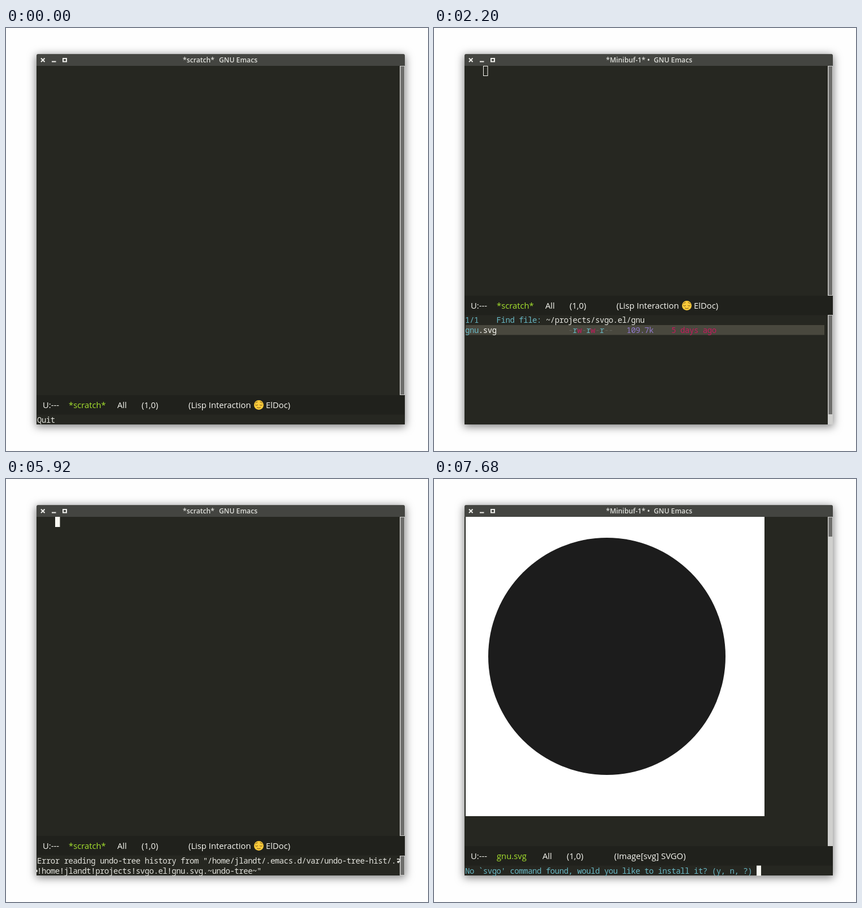
Animation, 747 px wide and 749 px high, one loop 8 s. Source, as an HTML page:

```html
<!DOCTYPE html>
<html lang="en">
<head>
<meta charset="utf-8">
<title>Editor</title>
<style>
  html, body { margin: 0; width: 100%; height: 100%; overflow: hidden; background: #fefefe; }
  #shade {
    position: absolute; left: 54px; top: 46px; width: 652px; height: 656px;
    border-radius: 3px 3px 0 0; box-shadow: 0 3px 15px 1px rgba(0, 0, 0, .5);
  }
  svg { position: absolute; left: 0; top: 0; display: block; }
  text { white-space: pre; }
  .mono { font: 14px "Noto Sans Mono", monospace; letter-spacing: -.46px; }
  .mode { font: 14.8px "Open Sans", sans-serif; }
  .title { font: 600 12.2px "Open Sans", sans-serif; }
</style>
</head>
<body>
<div id="shade"></div>
<svg width="747" height="749" viewBox="0 0 747 749">
  <path d="M54 67V49q0-3 3-3H703q3 0 3 3V67z" fill="#444541"/>
  <path d="M57 46.5H703" stroke="#555652"/>
  <g fill="none" stroke="#eeeeea" stroke-width="2">
    <path d="M62 53.500l6.500 6.500m0-6.500l-6.500 6.500M81 59.500h7.500"/>
    <rect x="101" y="54" width="6" height="5.500"/>
  </g>
  <rect x="54" y="67" width="652" height="635" fill="#262721"/>
  <g id="view"></g>
</svg>
<script>
const LOOP = 8000, CELL = 7.94, LEFT = 55, ROW = 17.64;
const FG = '#e4e4de', WHITE = '#f8f8f2', CYAN = '#68b7c3', PINK = '#c41a5c',
      PURPLE = '#8f78c9', DIM = '#5f6058', GREEN = '#a6e22e';

const esc = s => s.replace(/&/g, '&amp;').replace(/</g, '&lt;');
const rect = (x, y, w, h, fill, more = '') =>
  `<rect x="${x}" y="${y}" width="${w}" height="${h}" fill="${fill}" ${more}/>`;
const text = (cls, x, y, s, fill, more = '') =>
  `<text class="${cls}" x="${x}" y="${y}" fill="${fill}" ${more}>${esc(s)}</text>`;
const mono = (col, y, s, fill = FG, more) => text('mono', LEFT + col * CELL, y, s, fill, more);

// name end, application start
const titles = {
  scratch: ['*scratch*', 369, 377],
  mini: ['*Minibuf-1* •', 382, 389],
  file: ['~/projects/svgo.el/gnu.svg', 423, 432]
};
function title(key) {
  const [name, end, start] = titles[key];
  return text('title', end, 61, name, '#dedfda', 'text-anchor="end"') +
         text('title', start, 61, 'GNU Emacs', '#dedfda');
}

function scrollbar(top, bottom, thumbEnd = bottom) {
  return rect(697, top, 9, bottom - top, '#d0d0ce') +
         rect(698.5, top + 1, 6.5, thumbEnd - top - 2, '#6d6d6b');
}

function face(y) {
  return `<g transform="translate(447.5 ${y})" fill="none" stroke="#67491a" stroke-linecap="round">
    <circle r="8.500" fill="#fbcb3a" stroke="none"/>
    <path d="M-6-3.500q1.500-2 3.500-2M6-3.500q-1.500-2-3.500-2M-6 0q1.800 2 4 0M2 0q2.200 2 4 0M-3 4.500q3 2 6 0"/></g>`;
}

function modeline(top, image) {
  const y = top + 23, put = (x, s, fill = WHITE) => text('mode', x, y, s, fill);
  const left = rect(54, top, 652, 34.5, '#20211c') + put(65, 'U:---');
  return left + (image
    ? put(111, 'gnu.svg', GREEN) + put(192, 'All') + put(235, '(1,0)') + put(319, '(Image[svg] SVGO)')
    : put(111, '*scratch*', GREEN) + put(197, 'All') + put(240, '(1,0)') +
      put(323, '(Lisp Interaction') + face(top + 17.5) + put(460, 'ElDoc)'));
}

const picture = () => rect(56, 67, 529, 530, '#fff') +
  '<circle cx="306" cy="314" r="210" fill="#1c1c1c"/>';

function mainCursor(kind) {
  if (kind === 'solid') return rect(87, 67, 8.5, 18, WHITE);
  if (kind === 'hollow') return rect(87.5, 67.5, 7.5, 17, 'none', `stroke="${WHITE}"`);
  return '';
}

const block = (col, top) => rect(Math.round(LEFT + col * CELL), top, 8, 18, WHITE);

function fileRow(i, name, mode, size, age, typed) {
  const y = 540 + i * ROW;
  let out = i ? '' : rect(56, 526, 635, 17.5, '#49483e');
  [...name].forEach((c, k) => {
    const next = !i && k === typed.length;
    out += mono(k, y, c, k < typed.length ? CYAN : next ? '#fff' : WHITE, next ? 'font-weight="700"' : '');
  });
  [...mode].forEach((c, k) => out += mono(23 + k, y, c, { r: CYAN, w: PINK }[c] || DIM));
  return out + mono(36, y, size, PURPLE) + mono(46, y, age, PINK);
}

const files = [
  ['gnu.svg', '109.7k', '5 days ago'],
  ['svgo.el', '  4.2k', '5 days ago'],
  ['README.md', '  1.3k', '5 days ago']
];
const path = '~/projects/svgo.el/';

function finder(typed, cursor) {
  const list = typed ? files.slice(0, 1) : files;
  const head = `1/${list.length}    Find file: `;
  return scrollbar(508, 702, 685) + mono(0, 522, head, CYAN) +
    mono(head.length, 522, path + typed) +
    (cursor ? block(head.length + path.length + typed.length, 508) : '') +
    list.map(([n, s, a], i) => fileRow(i, n, '-rw-rw-r--', s, a, typed)).join('');
}

const echo = s => mono(0, 698.5, s);
const prompt = s => mono(0, 698.5, s, CYAN) + block(s.length, 684.5);
const hint = () => mono(0, 698.5, 'Type ') +
  rect(95.5, 685.5, 61, 16, '#30352f', 'stroke="#59615c"') +
  mono(5, 698.5, 'C-c C-c', '#8fc4d2') + mono(13, 698.5, 'to view the image as text');
const wrapped = 'Error reading undo-tree history from "/home/jlandt/.emacs.d/var/undo-tree-hist/.';
const wrapMark = (x, y, dir) =>
  `<path transform="translate(${x} ${y}) scale(${dir} 1)" d="M-2.500-3h3q2 0 2 2v1q0 2-2 2h-2m2-2l-2 2 2 2" fill="none" stroke="${WHITE}" stroke-width="1.300"/>`;
const error = () => scrollbar(667, 702) + mono(0, 681, wrapped) +
  wrapMark(694.5, 676, 1) + rect(54, 692, 1.5, 4, WHITE) +
  echo('!home!jlandt!projects!svgo.el!gnu.svg.~undo-tree~"');

function scratch(mini, cursor, top = 650, name = 'scratch') {
  return title(name) + mainCursor(cursor) + scrollbar(67, top) + modeline(top) + mini;
}
function viewer(mini, top, name) {
  return title(name) + picture() + scrollbar(67, top, 103) + modeline(top, true) + mini;
}
const search = (typed, cursor = true) => scratch(finder(typed, cursor), 'hollow', 474, 'mini');

const steps = [
  [0, () => scratch(echo('Quit'))],
  [200, () => scratch(echo('Quit'), 'solid')],
  [680, () => scratch(echo('Quit'))],
  [880, () => scratch(prompt('Find file: ' + path), 'hollow', 650, 'mini')],
  [960, () => search('')],
  [1520, () => search('g')],
  [1560, () => search('gn')],
  [1680, () => search('gnu')],
  [2200, () => search('gnu', false)],
  [2680, () => scratch(echo('gnu.svg has auto save data; consider M-x recover-this-file'), 'solid')],
  [5840, () => scratch(hint(), 'solid')],
  [5880, () => scratch(echo(wrapped), 'solid')],
  [5920, () => scratch(error(), 'solid', 632)],
  [6000, () => viewer(error(), 632, 'file')],
  [7560, () => viewer('', 650, 'file')],
  [7680, () => viewer(prompt("No `svgo' command found, would you like to install it? (y, n, ?) "), 650, 'mini')]
];

const view = document.getElementById('view');
let shown = -1;
function draw() {
  const t = performance.now() % LOOP;
  const i = steps.findLastIndex(s => s[0] <= t);
  if (i !== shown) view.innerHTML = steps[shown = i][1]();
  requestAnimationFrame(draw);
}
draw();
</script>
</body>
</html>
```
